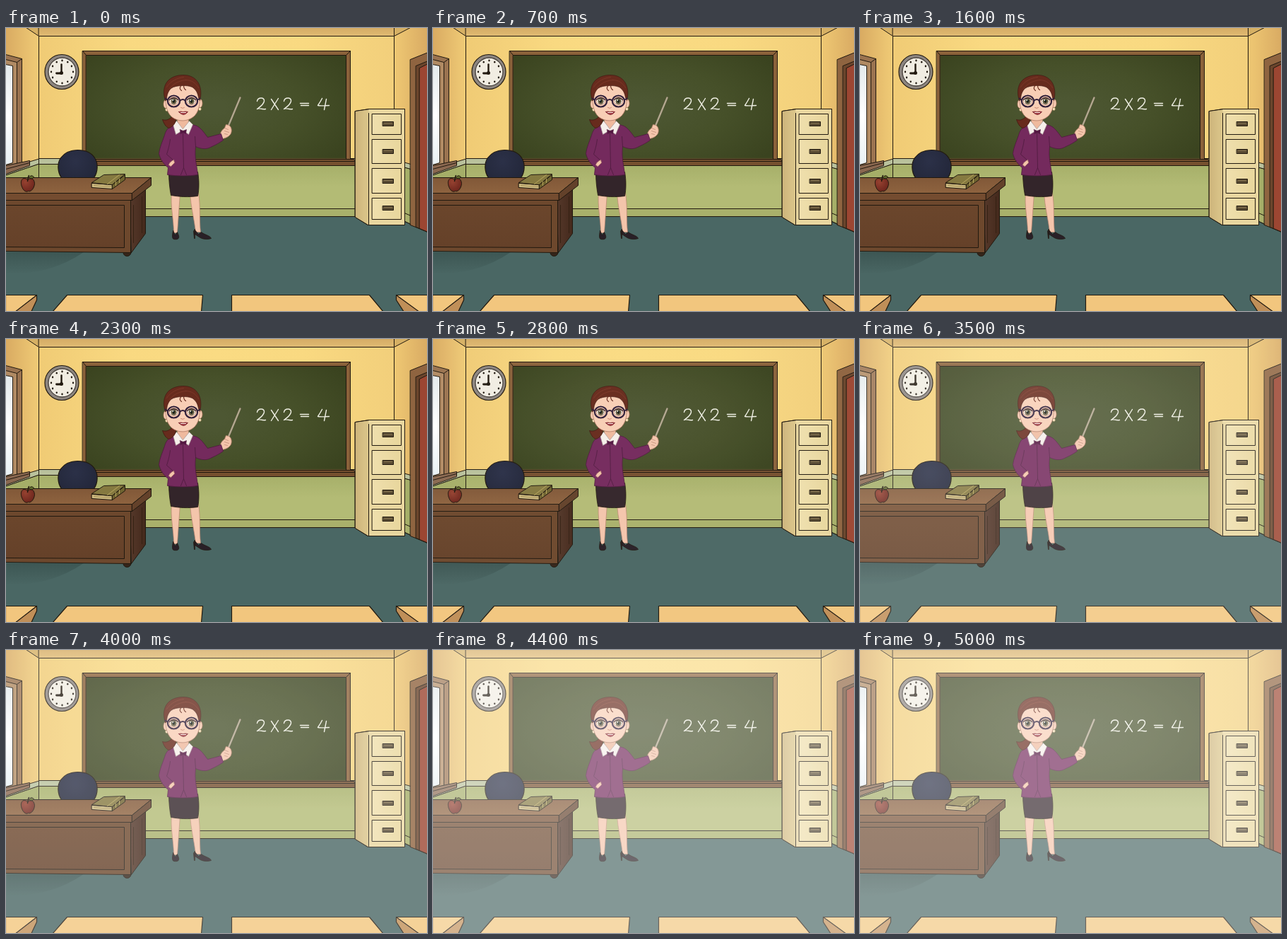
An HTML page with a canvas for the animation above (5100 ms loop, 596 by 400 pixels).

```html
<!DOCTYPE html>
<html lang="en">
<head>
<meta charset="utf-8">
<title>Classroom</title>
<style>
html, body { margin: 0; width: 100%; height: 100%; overflow: hidden; background: #fff; }
canvas { display: block; }
</style>
</head>
<body>
<canvas id="stage" width="596" height="400"></canvas>
<script>
const W = 596, H = 400, LOOP = 5100;
const INK = '#21190f';
const stage = document.getElementById('stage').getContext('2d');
const room = document.createElement('canvas');
room.width = W;
room.height = H;
const g = room.getContext('2d');
g.translate(0.5, 0.5); // crisp one-pixel lines

function shape(d, fill, line = INK, width = 1) {
  const path = new Path2D(d);
  if (fill) { g.fillStyle = fill; g.fill(path); }
  if (line) {
    g.strokeStyle = line;
    g.lineWidth = width;
    g.lineJoin = g.lineCap = 'round';
    g.stroke(path);
  }
}
const stroke = (d, color = INK, width = 1) => shape(d, null, color, width);
const box = (x, y, w, h, fill, line = INK, width = 1) =>
  shape(`M${x} ${y}h${w}v${h}h${-w}z`, fill, line, width);

function oval(x, y, rx, ry, fill, line = INK, width = 1) {
  g.beginPath();
  g.ellipse(x, y, rx, ry, 0, 0, 2 * Math.PI);
  if (fill) { g.fillStyle = fill; g.fill(); }
  if (line) { g.strokeStyle = line; g.lineWidth = width; g.stroke(); }
}

function blend(gradient, colors) {
  colors.forEach((c, i) => gradient.addColorStop(i / (colors.length - 1), c));
  return gradient;
}
const linear = (x0, y0, x1, y1, ...colors) => blend(g.createLinearGradient(x0, y0, x1, y1), colors);
const radial = (x, y, r0, r1, ...colors) => blend(g.createRadialGradient(x, y, r0, x, y, r1), colors);

function drawWalls() {
  box(-1, -1, W + 2, H + 2, '#d6b064', null);
  box(46, 11, 503, 175, linear(46, 0, 549, 0, '#f0cb75', '#f9d981', '#fadb83', '#f9d981', '#f2cf7b'));
  box(46, -1, 503, 12, linear(0, 0, 0, 11, '#d6ad66', '#dfba72'));
  box(46, 184, 503, 8, '#b9c19c');
  box(46, 192, 503, 63, linear(0, 192, 0, 255, '#a6af69', '#b3bb75', '#b3bb75'));
  box(46, 255, 503, 11, '#a9b06b');
  shape('M-1 -1H28L46 11V186L-1 200z', linear(0, 0, 46, 0, '#d9ab62', '#f0cb76'));
  shape('M46 185V192L-1 208V199z', '#b9c19c');
  shape('M46 192V266L-1 290V208z', '#a5ae68');
  shape('M597 -1H572L549 11V187L597 200z', linear(549, 0, 596, 0, '#efc873', '#d9ab63'));
  shape('M549 186V193L597 206V199z', '#b9c19c');
  shape('M549 193V266L597 288V206z', '#a5ae68');
  shape('M549 255V266L597 288V276z', '#a9b06b');
  shape('M-1 266H549L597 288V401H-1z', '#4a6764', null);
  stroke('M180 266H549L596 288');
}

function drawOpenings() {
  shape('M-1 37L22 43V191L-1 197z', '#9a7350');
  shape('M-1 44L15 48V191L-1 195z', '#b08a63');
  shape('M-1 51L9 53V190L-1 193z', linear(0, 53, 0, 193, '#e4eaec', '#ffffff', '#e9f1f4'));
  stroke('M15 48L22 43');
  shape('M-1 194L33 187V194L-1 206z', '#8a6850');
  stroke('M-1 199L33 190');
  shape('M572 44L597 34V288L572 278z', '#8f6440');
  shape('M580 53L597 46V288L580 281z', '#6b452c');
  shape('M585 56L597 50V288L585 283z', '#9c4632');
}

function drawBoard() {
  box(108, 32, 379, 160, '#8a613a');
  g.save();
  g.translate(298, 111);
  g.scale(1, 0.48);
  g.translate(-298, -111);
  box(113, -41, 368, 304, radial(290, 111, 20, 230, '#4d5733', '#465029', '#3a431f'), null);
  g.restore();
  box(113, 38, 368, 147, null);
  stroke('M108 32L113 38M487 32L481 38');
  shape('M104 185H492L494 188V194H103V188z', '#76502f');
  stroke('M103 188H494');
  const two = 'c1 -6 11 -6 10 0c-1 5 -6 8 -10 11c3 -2 6 1 12 0';
  stroke(`M355 103${two}M393 103${two}M375 100L385 115M385 99L375 115` +
    'M416 106H428M417 109H428M447 99C445 103 443 106 441 109C446 110 451 109 457 109M453 100L450 115', '#eeeee2', 1.4);
}

function drawClock() {
  oval(78.5, 61.5, 24, 24.5, '#8d8680', INK, 1.2);
  oval(79, 61.5, 19.5, 20, '#f1ede2', '#4a443f', 1.3);
  for (let n = 0; n < 12; n++) {
    const a = n * Math.PI / 6;
    oval(79 + 15.5 * Math.sin(a), 61.5 - 16 * Math.cos(a), 1.2, 1.4, INK, null);
  }
  stroke('M78 62V51', INK, 2.4);
  stroke('M78 63.500H71', INK, 2.8);
  oval(78, 63, 2.5, 2.5, INK, null);
}

function drawCabinet() {
  shape('M494 117L514 114H564V278H512L494 267z', '#e2cf95');
  shape('M494 117L513 115V278L494 267z', linear(494, 0, 513, 0, '#cdb47b', '#dcc78b'), null);
  shape('M513 115H564V278H513z', '#e8d69f', null);
  stroke('M494 117L514 114H564V278H512L494 267zM513 120V278');
  for (const [y, h, handle] of [[121, 29, 132], [157, 34, 171], [198, 35, 213], [240, 30, 251]]) {
    box(518, y, 41, h, linear(518, 0, 559, 0, '#efdfad', '#e8d69c'));
    box(533, handle, 15, 6, '#594b33');
    stroke(`M535 ${handle + 2}h11`, '#857350');
  }
}

function drawDesk() {
  shape('M78 211C72 203 72 190 77 183C83 175 92 172 101 172C110 172 120 175 125 183C130 190 130 203 124 211z',
    radial(98, 188, 2, 34, '#2b3047', '#23273a'), INK, 1.2);
  oval(171, 317, 5.5, 5, '#35251a');
  oval(194, 286, 3, 4, '#35251a');
  g.save();
  g.globalAlpha = 0.25;
  shape('M0 316H110Q60 350 0 346z', linear(0, 316, 0, 348, '#152522', '#15252200'), null);
  g.restore();
  shape('M175 243L197 226V290L177 317z', linear(175, 0, 197, 0, '#55382a', '#44291c'));
  shape('M-1 242H176V317L-1 315z', '#6d482d');
  shape('M-1 250H167V310L-1 309z', linear(0, 250, 0, 310, '#6b462c', '#654129'));
  shape('M-1 211H205L178 233H-1z', linear(0, 211, 0, 233, '#815838', '#8e633f'));
  shape('M-1 233H178V243H-1z', '#744c30');
  shape('M178 233L205 211V222L178 243z', '#63412a');
  stroke('M180 250V303M192 238V289', '#352113');

  shape('M30 214C24 209 20 214 21 220C22 227 27 233 31 230C35 232 40 225 40 219C39 211 34 211 30 214z',
    radial(27, 217, 1, 14, '#94402f', '#6d261d'));
  stroke('M30 216C31 213 30 211 32 208', INK, 1.5);
  shape('M32 211C34 207 37 208 39 210C37 213 34 213 32 211z', '#606b2d');

  shape('M121 219L150 221V227L121 225z', '#d0bd83');
  shape('M150 221L168 207V214L150 227z', '#6f6330');
  shape('M121 218L138 207L168 206L150 221z', '#857940');
  stroke('M124 222L149 224', '#8b7840', 0.7);
  stroke('M155 217V222M160 213V218M143 220L160 207', '#b9a75e');
}

function drawPupilDesks() {
  const top = '#f2c67e', side = '#c08f58';
  shape('M43 377V384L35 401H10z', side, INK, 1.2);
  shape('M-1 377H43L12 401H-1z', top, INK, 1.2);
  shape('M65 401L86 377H278L276 401z', top, INK, 1.2);
  shape('M319 377H514L534 401H319z', top, INK, 1.2);
  shape('M552 377V384L563 401H588z', side, INK, 1.2);
  shape('M552 377H597V401H585z', top, INK, 1.2);
}

function drawBody() {
  const skin = '#f4c5ab', skinLine = '#b98570', purple = '#742a5d', seam = '#4d1b3d';
  shape('M234 233H246L242 289H237C237 270 232 251 234 233z', skin, skinLine, 0.7);
  shape('M260 233H272C275 251 273 270 275 288H268C266 269 261 252 260 233z', skin, skinLine, 0.7);
  shape('M236 286C235 291 234 297 237 298C243 299 245 297 244 293L242 288L239 292z', '#292027', INK, 0.7);
  shape('M267 284L267 297H266L265 287zM267 285L272 291L276 288C281 292 289 293 290 297C284 299 277 298 273 295L267 291z',
    '#292027', INK, 0.7);
  shape('M230 203H271C273 215 273 227 271 237C257 239 245 238 233 236C231 225 230 214 230 203z', '#33252a', INK, 0.8);

  stroke('M308 153L331 98', '#6d6552', 2.8);
  stroke('M308 153L331 98', '#b5aa91', 2);
  shape('M303 151C303 146 306 143 309 141L311 136L315 137C319 139 320 146 317 150C313 155 308 155 304 157z',
    skin, skinLine, 0.8);
  stroke('M309 141L314 143M309 145L315 147M309 149L313 150', skinLine, 0.7);

  shape('M242 126H258V142L250 153L242 142z', '#efb99d', null);
  shape(`M238 136C231 138 226 143 224 151C221 160 217 168 216 177
    C218 186 224 193 229 197L228 207C242 209 258 209 271 207
    C270 194 266 184 268 167C276 171 284 171 289 168C296 165 303 161 307 158
    L304 149L285 154C280 148 275 139 267 137L259 135L250 147L241 135z`, purple, seam, 0.8);
  stroke('M232 157C231 165 229 172 227 178L236 186M267 153L268 167M250 148L251 197L247 207M251 197L255 207', seam, 0.8);
  shape('M230 193C231 189 235 187 237 186L238 190L233 195z', skin, skinLine, 0.7);
  shape('M241 131L236 136L240 150L250 144L258 150L264 136L259 131L250 142z', '#f6efea', '#a59596', 0.7);
  shape('M246 143L250 145L255 143L254 149L250 147L247 149z', '#541642', seam, 0.6);
}

function drawHead() {
  const hair = '#672b1d', skin = '#f8ceb5', frame = '#31203a';
  shape('M235 124C232 128 227 131 221 129C223 134 225 139 230 141C236 139 240 134 240 128z', hair, '#421810', 0.8);
  oval(226, 107, 3.5, 6, skin, '#b47b64', 0.7);
  oval(274, 106, 3.5, 6, skin, '#b47b64', 0.7);
  oval(227, 115, 1.8, 2, '#fff0ca', '#ae8b60', 0.6);
  oval(274, 114, 1.8, 2, '#fff0ca', '#ae8b60', 0.6);
  shape('M226 89C231 76 268 76 273 89C275 102 274 115 267 123C258 132 244 133 234 125C226 118 224 104 226 89z',
    skin, '#ae7561', 0.8);
  shape(`M225 102C219 84 226 67 249 66C270 65 279 82 274 102L272 98
    C271 91 268 86 263 83C258 81 254 81 250 81C243 81 237 82 233 85
    C229 89 227 94 227 101z`, hair, '#411a13', 0.7);
  stroke('M248 80C245 83 245 86 248 88M251 80C251 84 252 86 254 87', hair, 1.2);
  stroke('M227 83C233 74 242 70 251 69M231 85C238 76 247 74 254 73M272 84C268 77 262 73 254 73', '#843d2d', 0.7);

  for (const x of [237, 262]) {
    oval(x, 103, 6, 4.8, '#fff6e8', '#9c695b', 0.6);
    oval(x, 103, 3.6, 4, '#80704f', '#43432f', 0.7);
    oval(x, 103, 1.9, 2.4, '#17211b', null);
    oval(x - 1.2, 101.4, 0.9, 0.9, '#fff', null);
    stroke(`M${x - 6} 101Q${x} 95 ${x + 6} 101`, '#372124', 1.2);
    oval(x, 103, 8.6, 8, null, frame, 2.2);
  }
  stroke('M246 102Q250 99 253 102M228 101L225 99M271 101L274 99', frame, 2);
  stroke('M247 112Q250 114 252 112', '#c78470', 1);
  shape('M244 118Q247 117 250 118Q254 117 257 118Q251 126 244 118z', '#a33a42', '#742029', 0.8);
  stroke('M247 119H254', '#fff0e9', 1);
}

// White veil: [time in ms, opacity], linear between the points.
const VEIL = [[0, 0], [2700, 0], [3200, 0.1], [4000, 0.2], [4400, 0.32], [LOOP, 0.32]];

function veilAt(t) {
  const i = VEIL.findIndex(([time]) => time > t);
  const [t0, a0] = VEIL[i - 1], [t1, a1] = VEIL[i];
  return a0 + (a1 - a0) * (t - t0) / (t1 - t0);
}

[drawWalls, drawOpenings, drawBoard, drawClock, drawCabinet,
  drawDesk, drawPupilDesks, drawBody, drawHead].forEach(draw => draw());

const start = performance.now();
function render() {
  const t = Math.floor((performance.now() - start) % LOOP / 100) * 100;
  stage.drawImage(room, 0, 0);
  stage.fillStyle = `rgba(255,255,255,${veilAt(t)})`;
  stage.fillRect(0, 0, W, H);
  requestAnimationFrame(render);
}
render();
</script>
</body>
</html>
```
